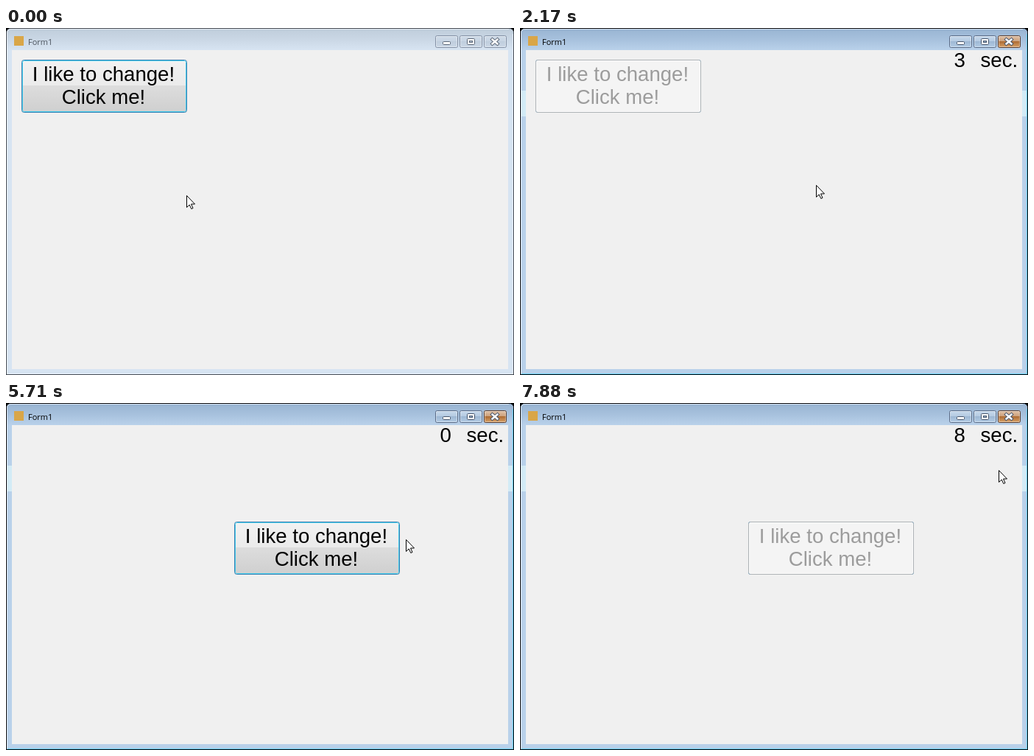
An HTML page that plays this animation: 690x471 px, repeating every 8000 ms.

```html
<!DOCTYPE html>
<html>
<head>
<meta charset="utf-8">
<style>
  html, body { margin: 0; width: 100%; height: 100%; overflow: hidden; background: #000; }
  svg { display: block; }
  text { font-family: "Liberation Sans", Arial, sans-serif; font-size: 27.6px; }
  .title { font-family: "Open Sans", sans-serif; font-size: 11px; }
  .mid { text-anchor: middle; }
</style>
</head>
<body>
<svg id="stage" width="690" height="471" viewBox="0 0 690 471"></svg>
<script>
const TICK = 67.3, LOOP = 8000;

// Vertical gradient with a hard split between its upper and lower half
const gloss = (id, [a, b, c, d], split = 0.48) => `
  <linearGradient id="${id}" x2="0" y2="1">
    <stop stop-color="${a}"/><stop offset="${split}" stop-color="${b}"/>
    <stop offset="${split}" stop-color="${c}"/><stop offset="1" stop-color="${d}"/>
  </linearGradient>`;

const box = (x, y, w, h, r, fill, stroke, extra = '') =>
  `<rect x="${x + .5}" y="${y + .5}" width="${w - 1}" height="${h - 1}" rx="${r}" fill="${fill}" stroke="${stroke}" ${extra}/>`;

const captionButton = (x, fill, edge) =>
  box(x, 10, 31, 17, 2, fill, edge) + box(x + 1, 11, 29, 15, 1, 'none', '#fff', 'stroke-opacity=".4"');

function windowFrame(id, c) {
  const cross = 'M660.5 15.5l7 6m0-6l-7 6';
  return `<g id="${id}">
    ${gloss(id + 'Bar', c.bar, .5)}${gloss(id + 'Btn', c.button)}${gloss(id + 'Close', c.close)}
    <path d="M.5 470.5V7Q.5 .5 7 .5H683Q689.5 .5 689.5 7V470.5Z" fill="${c.side}" stroke="${c.edge}"/>
    <path d="M1 30V7Q1 1 7 1H683Q689 1 689 7V30Z" fill="url(#${id}Bar)"/>
    <path d="M1.5 469V7Q1.5 1.5 7 1.5H683" fill="none" stroke="#fff" stroke-opacity=".6"/>
    <path d="M688.5 8V469.5H2" fill="none" stroke="${c.rim}"/>
    ${c.streak}
    <rect x="11" y="11" width="13" height="13" fill="#d9a648"/>
    <text class="title" x="30" y="23" fill="${c.text}">Form1</text>
    ${captionButton(583, `url(#${id}Btn)`, c.buttonEdge)}
    ${captionButton(616, `url(#${id}Btn)`, c.buttonEdge)}
    ${captionButton(649, `url(#${id}Close)`, c.closeEdge)}
    ${box(593, 18, 11, 5, 1, '#fff', c.glyph)}
    ${box(626, 14, 11, 9, 1, '#fff', c.glyph)}
    ${box(629, 17, 5, 3, 0, c.button[2], c.glyph)}
    <path d="${cross}" stroke="${c.glyph}" stroke-width="4.4" stroke-linecap="square"/>
    <path d="${cross}" stroke="#fff" stroke-width="2.4" stroke-linecap="square"/>
  </g>`;
}

const buttonLayer = (id, edge, inner, colors) => `
  <g id="${id}">${gloss(id + 'Fill', colors)}
    ${box(0, 0, 225, 72, 3, `url(#${id}Fill)`, edge)}${box(1, 1, 223, 70, 2, 'none', inner)}
  </g>`;

const inactive = {
  side: '#d7e4f2', edge: '#454b54', rim: '#e6eef7', text: '#4c545e', glyph: '#5d6878', streak: '',
  bar: ['#bfcddb', '#cad7e5', '#cad7e5', '#d7e4f2'],
  button: ['#cfdbe8', '#c7d4e3', '#bfcddd', '#cbd8e6'], buttonEdge: '#8390a5',
  close: ['#cfdbe8', '#c7d4e3', '#bfcddd', '#cbd8e6'], closeEdge: '#8390a5'
};
const active = {
  side: '#b9d1ea', edge: '#0a0c10', rim: '#62cdf0', text: '#000', glyph: '#48566c',
  streak: '<path d="M2 85h6v35h-6zM682 85h6v35h-6z" fill="#d3ebf6"/>',
  bar: ['#98b4d2', '#a7c1dd', '#a7c1dd', '#b9d1ea'],
  button: ['#c6d8eb', '#b5cbe2', '#9db7d3', '#b4cde6'], buttonEdge: '#596b87',
  close: ['#dfc1a6', '#cda17c', '#ac6a32', '#d9a368'], closeEdge: '#5a3d2e'
};

stage.innerHTML = windowFrame('inactiveFrame', inactive) + windowFrame('activeFrame', active) + `
  <rect x="8" y="30" width="674" height="433" fill="#f0f0f0"/>
  <g id="button">
    ${buttonLayer('normal', '#3c7fb1', '#45cdec', ['#f2f2f2', '#ebebeb', '#dddddd', '#cfcfcf'])}
    ${buttonLayer('hot', '#3c7fb1', '#f0fafe', ['#eaf6fd', '#d9f0fc', '#bee6fd', '#a7d9f5'])}
    ${buttonLayer('pressed', '#2c628b', '#8fb5cb', ['#e5f4fc', '#c4e5f6', '#98d1ef', '#68b3db'])}
    ${buttonLayer('disabled', '#adb2b5', '#fbfbfb', ['#f4f4f4', '#f4f4f4', '#f4f4f4', '#f4f4f4'])}
    <g id="caption" class="mid">
      <text x="111.5" y="29">I like to change!</text><text x="111.5" y="60">Click me!</text>
    </g>
  </g>
  <g id="timer"><text id="digit" x="589.5" y="53"></text><text x="625.5" y="53">sec.</text></g>
  <path id="cursor" d="M.5 .5V16.5L4.2 13L6.8 18.5L9 17.5L6.5 12H11.5Z" fill="#fff" stroke="#000"/>`;

// Tracks are lists of [tick, ...values]
const cursorTrack = [
  [3, 245, 227], [13, 238, 97], [16, 233, 97], [27, 236, 98], [29, 236, 98], [32, 402, 213],
  [79, 402, 213], [85, 543, 185], [88, 522, 187], [91, 522, 187], [92.5, 552, 195], [94, 587, 187],
  [96, 587, 187], [99, 646, 267], [110, 646, 267], [113, 655, 200], [117, 650, 91]
];
const hotTrack = [[11, 0], [15, 1], [79, 0], [81, .6], [85, 0], [86, .3], [88, 1]];
const countTrack = [[0, ''], [30, 3], [45, 2], [59, 1], [74, 0], [90, 9], [105, 8]];

const lastKey = (track, n) => Math.max(0, track.findLastIndex(key => key[0] <= n));

function sample(track, n) {
  const i = lastKey(track, n), a = track[i], b = track[i + 1] || a;
  const u = b === a ? 0 : Math.max(0, (n - a[0]) / (b[0] - a[0]));
  const eased = u * u * (3 - 2 * u);
  return a.slice(1).map((v, k) => v + (b[k + 1] - v) * eased);
}

const show = (el, on) => el.setAttribute('opacity', +on);
const move = (el, x, y) => el.setAttribute('transform', `translate(${Math.round(x)} ${Math.round(y)})`);
const within = (n, from, to) => n >= from && n < to;

function draw(t) {
  const n = Math.floor((t + 20) / TICK);
  const off = within(n, 30, 74) || n >= 90;
  const moved = n >= 74;

  show(inactiveFrame, n < 28);
  show(activeFrame, n >= 28);
  move(button, moved ? 310 : 21, moved ? 161 : 43);
  show(hot, n < 30 || n >= 79 ? sample(hotTrack, n)[0] : 0);
  show(pressed, n === 28 || n === 89);
  show(disabled, off);
  caption.setAttribute('fill', off ? '#9c9c9c' : '#000');
  show(timer, n >= 30);
  digit.textContent = countTrack[lastKey(countTrack, n)][1];
  move(cursor, ...sample(cursorTrack, n));
}

const start = performance.now();
function loop() {
  draw((performance.now() - start) % LOOP);
  requestAnimationFrame(loop);
}
loop();
</script>
</body>
</html>
```
